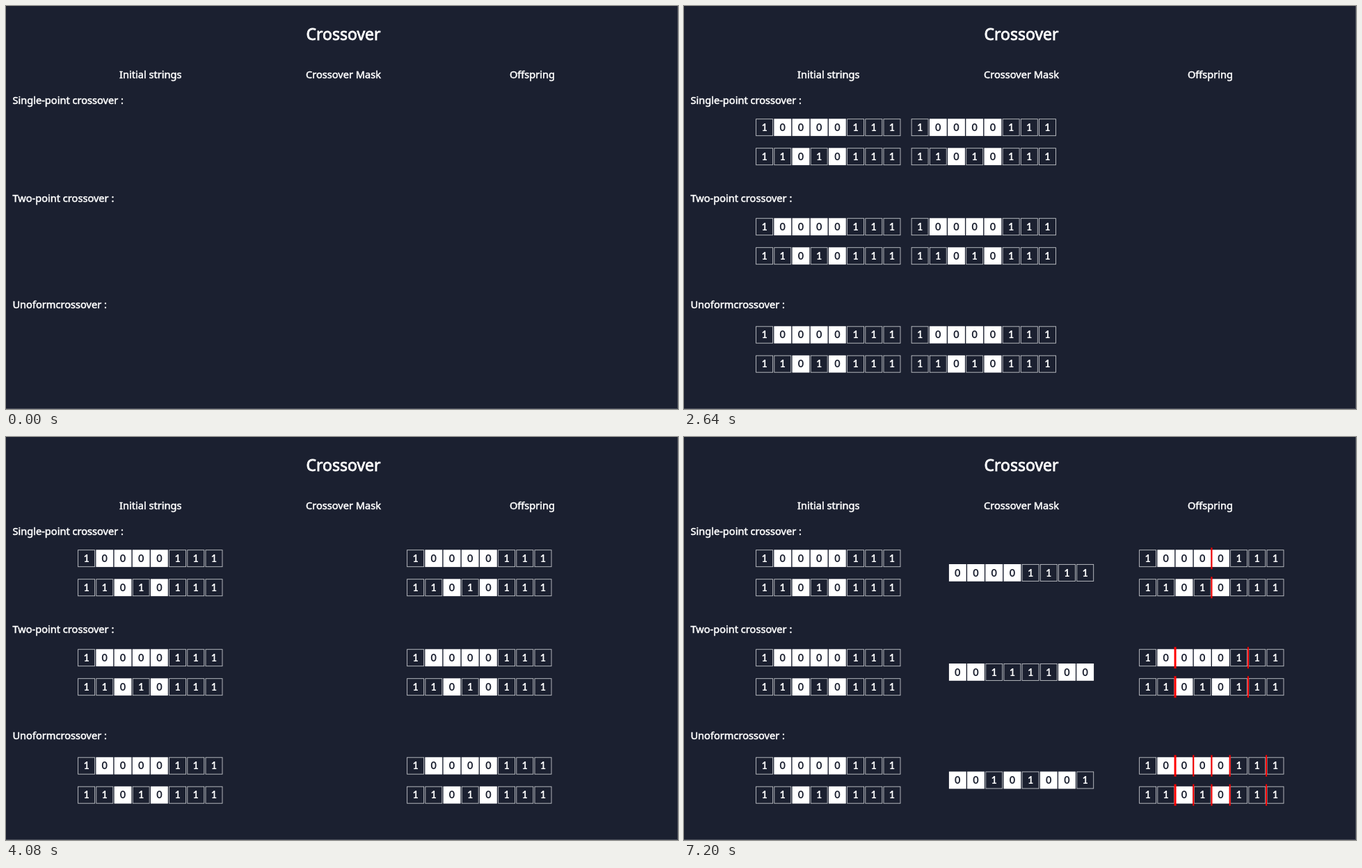
An HTML page for the animation above (8 s loop, 966x580 px).

```html
<!DOCTYPE html>
<html lang="en">
<head>
<meta charset="utf-8">
<title>Crossover</title>
<style>
  html, body { margin: 0; width: 100%; height: 100%; overflow: hidden; background: #1b2030; }
  svg { display: block; width: 966px; height: 580px; isolation: isolate; }
  text { font: 400 14.6px "Noto Sans", sans-serif; fill: #fff; stroke: #fff; stroke-width: .035em; }
  .title { font-size: 23px; }
  .mid { text-anchor: middle; }
  .digit { font: 700 14.5px Lato, sans-serif; stroke: none; }
  .zero { fill: #1b2030; }
  .layer { mix-blend-mode: lighten; }
  .one-box { fill: none; stroke: #c4c6cb; stroke-width: .9; }
  .zero-box { fill: #fff; }
  .cut { stroke: #f00; }
  .edge { fill: none; stroke: #4a4e5a; }
</style>
</head>
<body>
<svg viewBox="0 0 966 580">
  <rect width="966" height="580" fill="#1b2030"/>
  <path class="edge" d="M965.5 0V579.5H0"/>
  <g id="labels"></g>
  <g id="parents" class="layer"></g>
  <g id="offspring" class="layer"></g>
  <g id="masks"></g>
  <g id="cuts"></g>
</svg>
<script>
const PITCH = 26.2, CELL = 24, LEFT = 103.6, TRAVEL = 551;
const ROW_TOPS = [162.7, 305.7, 461.2], ROW_GAP = 42;
const PARENTS = ["10000111", "11010111"];
const MASKS = ["00001111", "00111100", "00101001"];
// Cell boundaries where each crossover swaps strings
const CUTS = [[4], [2, 6], [2, 3, 4, 5, 7]];

const layer = id => document.getElementById(id);

function add(parent, tag, attrs, content = "") {
  const node = document.createElementNS("http://www.w3.org/2000/svg", tag);
  for (const key in attrs) node.setAttribute(key, attrs[key]);
  node.textContent = content;
  parent.append(node);
}

function label(content, x, y, cls = "") {
  add(layer("labels"), "text", { x, y, class: cls }, content);
}

function bits(parent, string, left, top) {
  [...string].forEach((bit, i) => {
    const x = left + i * PITCH, kind = bit === "0" ? "zero" : "one";
    const grow = bit === "0" ? .4 : 0, size = CELL + 2 * grow;
    add(parent, "rect", { x: x - grow, y: top - grow, width: size, height: size, class: kind + "-box" });
    add(parent, "text", { x: x + CELL / 2, y: top + 17.2, class: "digit mid " + kind }, bit);
  });
}

label("Crossover", 485, 49, "title mid");
label("Initial strings", 207.8, 103.5, "mid");
label("Crossover Mask", 485, 103.5, "mid");
label("Offspring", 756.5, 103.5, "mid");
label("Single-point crossover :", 9.4, 141);
label("Two-point crossover :", 9.4, 282);
label("Unoformcrossover :", 9.4, 435);

ROW_TOPS.forEach((top, group) => {
  PARENTS.forEach((string, row) => {
    const y = top + row * ROW_GAP;
    bits(layer("parents"), string, LEFT, y);
    bits(layer("offspring"), string, LEFT, y);
    for (const cut of CUTS[group]) {
      const x = LEFT + TRAVEL + cut * PITCH - .9;
      add(layer("cuts"), "line", {
        x1: x, x2: x, y1: y - 3.5, y2: y + 27.5, class: "cut", "stroke-width": cut === 2 ? 3 : 2
      });
    }
  });
  bits(layer("masks"), MASKS[group], 381.3, top + 20.7);
});

const progress = (t, from, to) => Math.min(1, Math.max(0, (t - from) / (to - from)));

function draw(now) {
  const t = Math.floor(now % 8000 / 30) * 30;
  const fade = (id, from, to) => layer(id).setAttribute("opacity", progress(t, from, to));
  fade("parents", 30, 480);
  fade("offspring", 870, 1320);
  fade("masks", 5430, 5880);
  fade("cuts", 6690, 7200);
  layer("offspring").setAttribute("transform", `translate(${TRAVEL * progress(t, 1350, 4530)} 0)`);
  requestAnimationFrame(draw);
}
requestAnimationFrame(draw);
</script>
</body>
</html>
```
